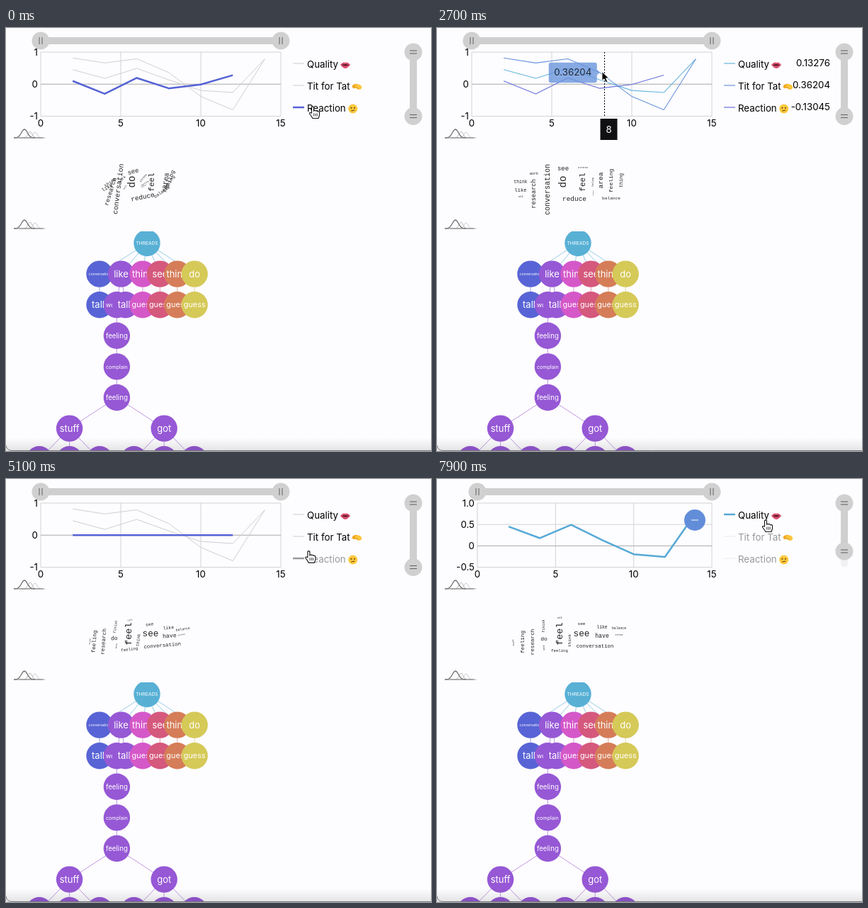
Recreate the animation shown at these times as an HTML page with a canvas. Size 600 px wide and 597 px high, loop 8 s.

```html
<!DOCTYPE html>
<html lang="en">
<head>
<meta charset="utf-8">
<title>Thread dashboard</title>
<style>
html, body { margin: 0; width: 100%; height: 100%; overflow: hidden; background: #fdfcfe; }
canvas { display: block; }
</style>
</head>
<body>
<canvas id="stage" width="600" height="597"></canvas>
<script>
const c = document.getElementById('stage').getContext('2d');
const LOOP = 8000, TOP = 34, BOTTOM = 124.5, RIGHT = 388;
const SANS = 'Inter, Roboto, sans-serif', MONO = '"Liberation Mono", monospace';

// Values stand at x = 2, 4, 6 ...
const series = [
  { name: 'Quality', color: '#67b7dc', bold: '#56a9d6', off: Infinity,
    data: [.4512, .18034, .49191, .13276, -.1963, -.26048, .78543] },
  { name: 'Tit for Tat', color: '#6794dc', bold: '#4f80d5', off: 5500,
    data: [.8175, .66113, .78993, .36204, -.38311, -.80127, .78543] },
  { name: 'Reaction', color: '#6771dc', bold: '#5563d5', off: 4700,
    data: [.09873, -.30218, .19388, -.13045, -.00949, .27964] }
];
series.forEach((s, n) => s.y = 52 + 31 * n);

// Pointer stops: time, x, y
const path = [
  [0, 433, 111], [250, 433, 111], [900, 350, 105], [1600, 300, 98], [2000, 275, 81],
  [3150, 206, 49], [3700, 206, 49], [4090, 384, 75], [4300, 425, 107], [5000, 425, 108],
  [5300, 432, 89], [6150, 432, 89], [6600, 340, 75], [6900, 369, 55], [7150, 388, 56],
  [7600, 464, 58], [8000, 464, 58]
];

const clamp = (v, a = 0, b = 1) => Math.min(b, Math.max(a, v));
const easeOut = p => 1 - (1 - clamp(p)) ** 3;
const mix = (a, b, p) => a + (b - a) * p;

// Each stack is a centre and words with their size; ^ turns a word upright.
// Smaller words start nearer the middle and more tilted.
function layWords(stacks) {
  return stacks.flatMap(([x, mid, list]) => {
    const words = list.split(' ').map(w => {
      const [, up, label, size] = w.match(/(\^?)([a-z]+)([\d.]+)/);
      return { label, size: +size, turn: up ? -90 : 0, tall: up ? .6 * size * label.length : +size };
    });
    let y = mid - words.reduce((sum, w) => sum + w.tall + 5, -5) / 2;
    return words.map(w => {
      const cy = y + w.tall / 2, k = clamp(w.size / 11);
      y += w.tall + 5;
      return { ...w, x, y: cy, x0: mix(187, x, k), y0: mix(220, cy, k),
        turn0: w.turn + (1 - k) * (w.turn ? 80 : -80) };
    });
  });
}
const firstCloud = layWords([
  [118, 227, 'think6.3 like7 talk3'], [137, 229, 'work5 ^research8.6'], [156, 228, '^conversation10'],
  [178, 210, 'see9 ^do14'], [194, 242, 'reduce9.4'], [206, 213, 'stress4 ^feel11'],
  [220, 224, '^feeling3 ^guess2.5'], [231, 215, '^area9.6'], [246, 221, '^feeling8 balance6.2'], [260, 215, '^thing6.7']
]);
const secondCloud = layWords([
  [108, 231, '^stuff3'], [121, 230, '^feeling7.6'], [135, 230, '^research7.7'], [151, 220, '^finish5 do8 ^work3'],
  [173, 220, 'talk3 ^feel13.5 feeling5.7'], [187, 228, '^think6'], [204, 213, 'see6.2 see12.7'],
  [223, 236, 'conversation7.3'], [233, 216, 'like6.4 have8.2'], [257, 215, 'balance4.8 stress3']
]);

const tree = [];
function grow(label, x, depth, branch, parent) {
  const node = { label, x, y: 303.5 + 43.6 * depth, color: `hsl(${234 + 36 * branch} 60% 59%)`, parent };
  tree.push(node);
  return node;
}
function plantTree() {
  const root = grow('THREADS', 199, 0, -1);
  let stem;
  'conversation like think see thing do'.split(' ').forEach((label, i) => {
    const top = grow(label, 132 + 24.4 * (i + Math.min(i, 2) / 4), 1, i, root);
    const kids = i === 1 ? ['wonder', 'talk'] : [i ? 'guess' : 'talk'];
    kids.forEach((kid, j) => {
      const node = grow(kid, top.x + 12.2 * (j - (kids.length - 1) / 2), 2, i, top);
      if (kid === 'wonder') stem = node;
    });
  });
  ['feeling', 'complain', 'feeling'].forEach((label, i) => stem = grow(label, stem.x, 3 + i, 1, stem));
  ['stuff', 'got'].forEach((label, i) => {
    const fork = grow(label, stem.x + 133.6 * (i - .5), 6, 1, stem);
    for (const side of [-1, 0, 1]) grow('', fork.x + 42.6 * side, 7, 1, fork);
  });
}
plantTree();

function pointer(t) {
  t = clamp(t, 0, LOOP);
  const i = Math.max(1, path.findIndex(k => k[0] >= t));
  const [t0, x0, y0] = path[i - 1], [t1, x1, y1] = path[i];
  const p = (t - t0) / (t1 - t0);
  return { x: mix(x0, x1, p), y: mix(y0, y1, p) };
}

function view(t) {
  const zoom = easeOut((t - 5500) / 500), low = mix(-1, -.5, zoom);
  const fine = t >= 6000, left = fine ? 57 : 49;
  return {
    zoom, left, fine,
    x: v => left + v * (RIGHT - left) / 15,
    y: v => TOP + (1 - v) * (BOTTOM - TOP) / (1 - low),
    value: x => (x - left) * 15 / (RIGHT - left)
  };
}

// The data point that the pointer picks out, if it is over the plot
function pick(t) {
  const m = pointer(t), v = view(t);
  if (m.x < v.left || m.x > RIGHT || m.y < TOP || m.y > BOTTOM) return null;
  const i = clamp(Math.round(v.value(m.x) / 2), 1, 7) - 1;
  let best = 0, gap = Infinity;
  series.forEach((s, n) => {
    if (t >= s.off || s.data[i] === undefined) return;
    const d = Math.abs(v.y(s.data[i]) - m.y);
    if (d < gap) { gap = d; best = n; }
  });
  return { i, best };
}

function line(color, width, ...pts) {
  c.strokeStyle = color;
  c.lineWidth = width;
  c.beginPath();
  for (let i = 0; i < pts.length; i += 2) c.lineTo(pts[i], pts[i + 1]);
  c.stroke();
}
function oval(x, y, rx, ry, turn, color) {
  c.fillStyle = color;
  c.beginPath();
  c.ellipse(x, y, rx, ry, turn, 0, 7);
  c.fill();
}
const disc = (x, y, r, color) => oval(x, y, r, r, 0, color);
function box(x, y, w, h, color, r = 0) {
  c.fillStyle = color;
  c.beginPath();
  c.roundRect(x, y, w, h, r);
  c.fill();
}
function text(s, x, y, size, color, align = 'left', font = SANS) {
  c.font = size + 'px ' + font;
  c.fillStyle = color;
  c.textAlign = align;
  c.textBaseline = 'middle';
  c.fillText(s, x, y);
}
function shape(d, fill, stroke, width = 1) {
  const p = new Path2D(d);
  if (fill) { c.fillStyle = fill; c.fill(p); }
  if (stroke) { c.strokeStyle = stroke; c.lineWidth = width; c.stroke(p); }
}
function at(x, y, draw, turn = 0) {
  c.save();
  c.translate(x, y);
  c.rotate(turn * Math.PI / 180);
  draw();
  c.restore();
}

function grip(x, y, turn) {
  disc(x, y, 12.5, '#d0d0d0');
  at(x, y, () => {
    for (const side of [-2, 2]) line('#666', 1.1, side, -5, side, 5);
  }, turn);
}
function scrollbars(v) {
  const end = mix(BOTTOM, 102, v.zoom);
  box(v.left, 13, RIGHT - v.left, 10, '#cfcfcf');
  grip(v.left, 18, 0);
  grip(RIGHT, 18, 0);
  box(570, TOP, 10, BOTTOM - TOP, '#f1f0f2', 5);
  box(570, TOP, 10, end - TOP, '#cfcfcf');
  grip(575, TOP, 90);
  grip(575, end, 90);
}

function chart(t, v, hover) {
  for (const x of [0, 5, 10, 15]) {
    line('#d3d3d5', 1, v.x(x), TOP, v.x(x), BOTTOM);
    text(x, v.x(x), 135, 13.3, '#000', 'center');
  }
  for (const y of v.fine ? [1, .5, 0, -.5] : [1, 0, -1]) {
    const py = v.y(y);
    if (py > BOTTOM + 1) continue;
    line(y ? '#d3d3d5' : '#a9a9ab', 1, v.left, py, RIGHT, py);
    text(v.fine && y ? y.toFixed(1) : y, v.left - 4, py + .5, 13.3, '#000', 'right');
  }
  c.save();
  c.beginPath();
  c.rect(v.left, TOP, RIGHT - v.left, BOTTOM - TOP);
  c.clip();
  c.lineJoin = 'round';
  series.forEach((s, n) => {
    const shown = 1 - easeOut((t - s.off) / 500);
    if (!shown) return;
    const pts = s.data.flatMap((d, i) => [v.x(2 * i + 2), v.y(d * shown)]);
    if (hover < 0) line(s.color, 1.1, ...pts);
    else line(n === hover ? s.bold : '#cfcfd1', n === hover ? 2.5 : 1, ...pts);
  });
  c.restore();
}

const emoji = [
  () => {
    shape('M-7 0Q-3 -5 0 -3Q3 -5 7 0Q3 5 0 5Q-3 5 -7 0Z', '#d94f70');
    shape('M-5 0Q0 -2 5 0Q0 3 -5 0Z', '#5a1a28');
  },
  () => {
    oval(-2.5, -1, 4.5, 3, -.3, '#f2a922');
    oval(2, 0, 4.8, 3.6, .4, '#fbc53c');
    line('#c98a1c', .8, -2, 0, 2, 3);
  },
  () => {
    disc(0, 0, 6.5, '#fcc93c');
    for (const side of [-2.3, 2.3]) disc(side, -1.2, 1, '#5b3a12');
    line('#5b3a12', 1, -2.5, 3, 2.5, 2);
  }
];

function legend(t, hover, target) {
  series.forEach((s, n) => {
    const off = t >= s.off, mine = n === hover;
    const color = off ? '#999' : '#000';
    let mark = off ? '#999' : mine ? s.bold : s.color;
    if (hover >= 0 && !mine) mark = off ? '#ececee' : '#d5d5d7';
    line(mark, mine ? 2.5 : 1.2, 405, s.y - 2, 421, s.y - 2);
    text(s.name, 425, s.y, 13.3, color);
    at(435 + c.measureText(s.name).width, s.y, emoji[n]);
    const d = target && s.data[target.i];
    if (d) text(d, 555, s.y - 2, 13.3, color, 'right');
  });
}

// Tooltips fade in and out over the last few pointer samples
function tooltips(t, v) {
  const past = [0, 1, 2, 3, 4, 5].map(k => pick(t - 40 * k));
  const last = past.find(Boolean);
  if (!last) return;
  const share = test => past.filter(p => p && test(p)).length / 6;
  const here = share(() => true), same = share(p => p.i === last.i && p.best === last.best);
  const lineX = Math.min(RIGHT, pointer(t - 60).x);

  if (past[0]) {
    c.setLineDash([2, 2]);
    line('#000', 1, lineX, TOP, lineX, BOTTOM);
    c.setLineDash([]);
  }

  const s = series[last.best], d = s.data[last.i];
  const px = v.x(2 * last.i + 2), py = v.y(d), side = px < 220 ? 1 : -1;
  c.font = '13.3px ' + SANS;
  const w = c.measureText(d).width + 15, mid = px + side * (4 + w / 2);
  c.globalAlpha = .78 * same ** 1.2;
  box(mid - w / 2, py - 14, w, 28.5, s.color, 3);
  shape(`M${px} ${py}l${side * 4} -4v8z`, s.color);
  c.globalAlpha = clamp(2 * same - 1) * .75;
  text(d, mid, py + .5, 13.3, '#000', 'center');

  const value = Math.round(v.value(lineX)), bw = value > 9 ? 31 : 24;
  const bx = Math.min(pointer(t - 160).x, RIGHT - bw / 2);
  c.globalAlpha = here ** 2;
  box(bx - bw / 2, 128, bw, 30, '#101012');
  text(value, bx, 143.5, 13.3, '#fff', 'center');
  c.globalAlpha = 1;
}

function zoomButton(t, m) {
  c.globalAlpha = clamp((t - 5500) / 200);
  disc(364, 58, 15, Math.hypot(m.x - 364, m.y - 58) < 15 ? '#596fd6' : '#628dd9');
  line('#fff', 1, 359, 58, 369, 58);
  c.globalAlpha = 1;
}

function bell(x, base, peak, spread, color, width) {
  const pts = [];
  for (let d = -15; d <= 15; d++) pts.push(x + d, base - peak * Math.exp(-((d / spread) ** 2)));
  line(color, width, ...pts);
}
function curves(base) {
  bell(41, base, 8, 4, '#c9c9cb', 1);
  bell(34, base, 9, 4, '#bcbcbe', 1);
  bell(26, base, 12, 6, '#666', 1.2);
  line('#777', 1, 11, base, 53, base);
}

function cloud(words, p, alpha) {
  c.globalAlpha = alpha;
  for (const w of words)
    at(mix(w.x0, w.x, p), mix(w.y0, w.y, p),
      () => text(w.label, 0, 0, w.size, '#222', 'center', MONO), mix(w.turn0, w.turn, p));
  c.globalAlpha = 1;
}

function drawTree() {
  c.save();
  c.beginPath();
  c.rect(0, 287, 600, 310);
  c.clip();
  c.globalAlpha = .6;
  for (const { x, y, parent: up } of tree) if (up) line(up.color, 1, up.x, up.y, x, y);
  c.globalAlpha = 1;
  for (const { x, y, color, label } of tree) {
    disc(x, y, 18.7, color);
    c.font = '13px ' + SANS;
    const size = Math.min(13, 13 * 31 / (c.measureText(label).width || 1));
    text(label, x, y + .5, size, '#fff', 'center');
  }
  c.restore();
}

function windowEdge() {
  const shade = c.createLinearGradient(0, 578, 0, 597);
  shade.addColorStop(0, 'rgba(0,0,0,0)');
  shade.addColorStop(1, 'rgba(0,0,0,.1)');
  box(0, 578, 600, 19, shade);
  shape('M0 589Q1 596.5 9 596.5H600', null, '#77777a');
}

function cursor(m, hand) {
  at(m.x, m.y, () => {
    if (!hand) return shape('M0 0V13L3 10.3L5.2 15.3L7.8 14.2L5.6 9.4H9.7Z', '#000', '#fff');
    shape('M-1.5 1Q0 -1 1.5 1V6Q3 4.5 4.5 6Q6 5 7 7Q9 6 9.5 8V12Q9 14 8 16.5H0Q-2 13 -4.5 10Q-5 7.5 -1.5 9Z',
      '#fff', '#111', 1.1);
    for (const x of [1.7, 4, 6.2]) line('#111', .8, x, 9.5, x, 13.5);
  });
}

function draw(t) {
  const v = view(t), m = pointer(t);
  const inLegend = m.x > 400 && m.x < 505;
  const hover = inLegend ? series.findIndex(s => Math.abs(m.y - s.y) <= 15.5) : -1;
  box(0, 0, 600, 597, '#fdfcfe');
  scrollbars(v);
  chart(t, v, hover);
  legend(t, hover, pick(t));
  curves(155);
  curves(283);
  if (t < 4800) cloud(firstCloud, easeOut(t / 700), 1);
  else cloud(secondCloud, easeOut((t - 4800) / 700), clamp((t - 4800) / 300));
  drawTree();
  zoomButton(t, m);
  tooltips(t, v);
  windowEdge();
  cursor(m, hover >= 0);
}

function frame(now) {
  draw(now % LOOP);
  requestAnimationFrame(frame);
}
requestAnimationFrame(frame);
</script>
</body>
</html>
```
